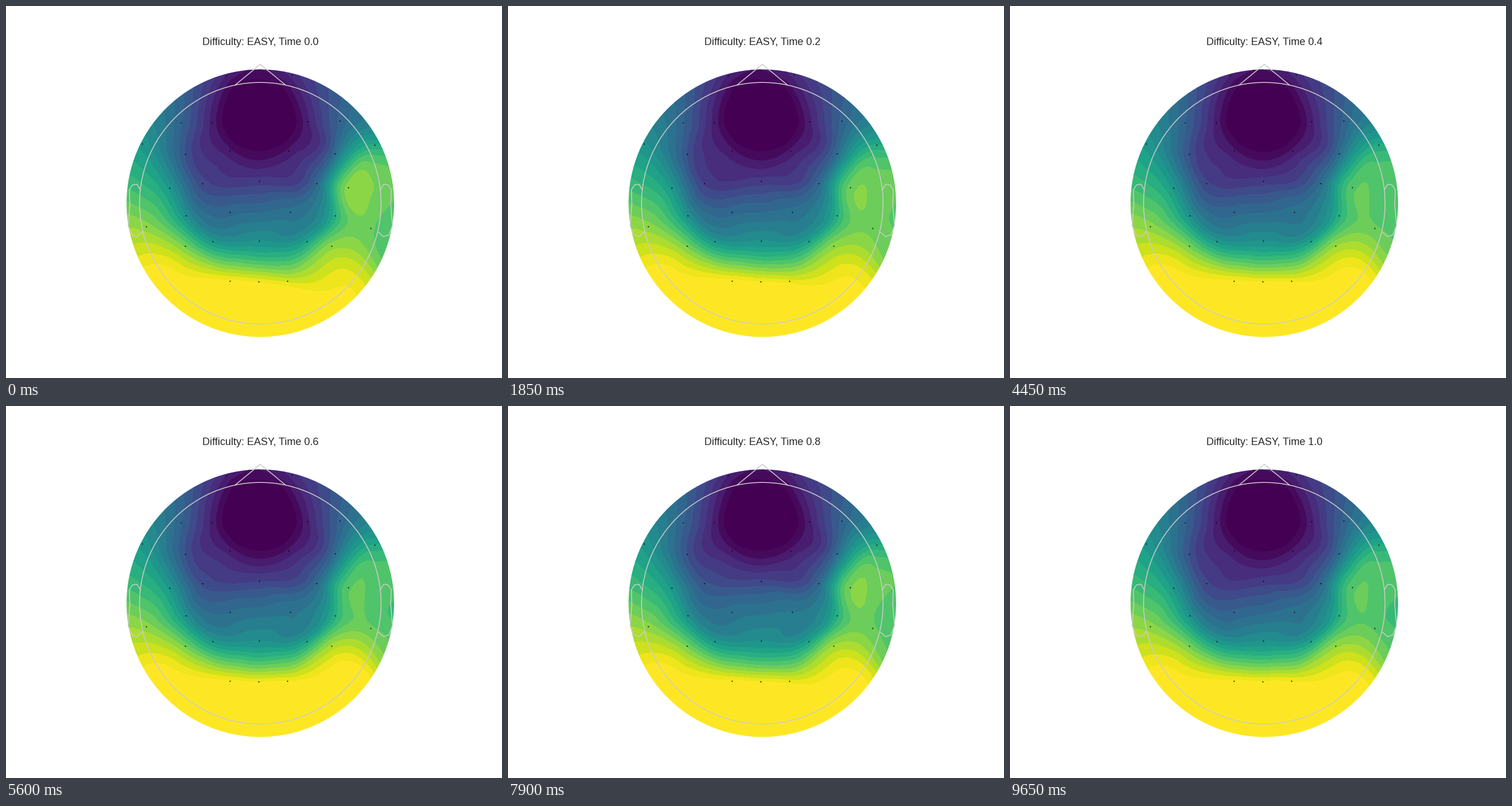
Write a matplotlib script that moves like this. It is 864x648 px and loops after 10 s.

```python
import numpy as np
import matplotlib.pyplot as plt
from matplotlib.animation import FuncAnimation
from matplotlib.patches import Circle
from matplotlib.tri import CubicTriInterpolator, Triangulation

WIDTH, HEIGHT, DPI = 864, 648, 72
STEP_MS, FRAMES = 50, 200
CENTER = np.array([443.0, 343.5])
HEAD_R, CLIP_R = 210.4, 233.0
LINE = dict(color="0.8", lw=1.5, solid_capstyle="round", zorder=3)

# electrode: x, y, resting level on the colour scale
SENSORS = {
    "Fp1": (382.5, 121, .10), "Fp2": (498, 119.5, .12),
    "F7": (304.5, 202.5, .31), "F3": (359, 202.5, .08), "Fz": (441, 201, -.2),
    "F4": (524.5, 201, .08), "F8": (581, 199.5, .31),
    "FT9": (236.5, 240, .53), "FC5": (311.5, 258, .25), "FC1": (390, 252, .06),
    "FC2": (492, 252, .06), "FC6": (572.5, 257, .35), "FT10": (641.5, 241.5, .60),
    "T7": (284.5, 316.5, .53), "C3": (342, 308.5, .22), "Cz": (441, 304.5, .17),
    "C4": (541, 308.5, .33), "T8": (595.5, 316, .82),
    "TP9": (244, 383.5, .82), "CP5": (313, 365, .50), "CP1": (389.5, 359, .33),
    "CP2": (495, 359, .37), "CP6": (572.5, 365, .62), "TP10": (634.5, 386.5, .76),
    "P7": (312, 417.5, .78), "P3": (360, 410, .53), "Pz": (440.5, 408.5, .50),
    "P4": (523.5, 410, .57), "P8": (567, 417.5, .82),
    "O1": (390, 479, 1.01), "Oz": (439.5, 479.5, .98), "O2": (489.5, 478.5, .93),
}
NAMES = list(SENSORS)
POS = np.array([s[:2] for s in SENSORS.values()])
REST = np.array([s[2] for s in SENSORS.values()])

# drift from rest at a few moments (ms)
DRIFT = {
    400: {},
    1850: dict(T8=-.05, C3=-.03, O1=.01, Oz=.01, O2=.03, TP10=.02, FT9=-.02),
    2900: dict(T8=-.06, C3=-.02, Oz=.01, O2=.05, P8=.01, C4=.02),
    4450: dict(T8=-.09, C3=-.01, Oz=.01, O2=.05, P8=.02, C4=.02),
    6700: dict(T8=-.08, C3=.04, Cz=.05, CP1=.04, CP2=.04, FC1=.02, O2=.07, P8=.06),
    7900: dict(T8=-.03, C3=.04, Cz=.04, CP1=.04, CP2=.03, Oz=.01, O2=.03, P8=.03),
    9650: dict(T8=-.09, C3=-.01, CP1=-.02, Oz=.02, O2=.06, P8=.01, TP10=-.02),
}
# spans (ms) in which the map moves; it rests in between
ACTIVE = [(400, 950), (1100, 1150), (1350, 1550), (1700, 1850), (2000, 2000),
          (2150, 2350), (2500, 2900), (3050, 3100), (3250, 3350), (3500, 3650),
          (3850, 4000), (4300, 4800), (5000, 5000), (5250, 5750), (6000, 6200),
          (6400, 6550), (6700, 6800), (6950, 7000), (7150, 7500), (7700, 8000),
          (8200, 8350), (8500, 8700), (8900, 8950), (9100, 9650)]


def levels_at(ms):
    moved = 0
    for start, end in ACTIVE:
        if ms >= start:
            moved = min(ms, end)
    times = list(DRIFT)
    drift = [np.interp(moved, times, [d.get(n, 0) for d in DRIFT.values()])
             for n in NAMES]
    return REST + drift


def build_basis(gx, gy):
    """Response of the interpolated surface to each electrode."""
    inner = Triangulation(*POS.T).triangles
    sides = np.concatenate([POS[inner[:, 0]] - POS[inner[:, 1]],
                            POS[inner[:, 1]] - POS[inner[:, 2]]])
    gap = np.median(np.hypot(*sides.T))
    count = max(12, round(2 * np.pi / np.arcsin(gap / CLIP_R)))
    angle = np.arange(count) * 2 * np.pi / count
    rim = CENTER + (CLIP_R * 1.1 + gap) * np.column_stack([np.cos(angle), np.sin(angle)])
    tri = Triangulation(*np.concatenate([POS, rim]).T)

    # each rim point takes the mean of the electrodes it touches
    n = len(POS)
    weights = np.vstack([np.eye(n), np.zeros((count, n))])
    for a, b in np.sort(tri.edges, axis=1):
        if a < n <= b:
            weights[b, a] = 1
    total = weights.sum(axis=1, keepdims=True)
    linked = total[:, 0] > 0
    weights[linked] /= total[linked]
    weights[~linked] = weights[n:][linked[n:]].mean(axis=0)
    return np.stack([CubicTriInterpolator(tri, w, kind="min_E")(gx, gy).filled(0)
                     for w in weights.T], axis=-1)


plt.rcParams["font.family"] = "Liberation Sans"
fig = plt.figure(figsize=(WIDTH / DPI, HEIGHT / DPI), dpi=DPI, facecolor="white")
ax = fig.add_axes([0, 0, 1, 1])
ax.set(xlim=(0, WIDTH), ylim=(HEIGHT, 0))
ax.axis("off")

span = np.linspace(-CLIP_R - 2, CLIP_R + 2, 100)
GX, GY = np.meshgrid(CENTER[0] + span, CENTER[1] + span)
BASIS = build_basis(GX, GY)
BANDS = np.linspace(0, 1, 21)
clip = Circle(CENTER, CLIP_R, transform=ax.transData)


def outline(x, y):
    ax.plot(CENTER[0] + HEAD_R * np.array(x), CENTER[1] - HEAD_R * np.array(y), **LINE)


turn = np.linspace(0, 2 * np.pi, 101)
outline(np.cos(turn), np.sin(turn))
nose = np.arccos(np.deg2rad(12))
outline([-np.cos(nose), 0, np.cos(nose)], [np.sin(nose), 1.15, np.sin(nose)])
ear_x = 2 * np.array([.497, .510, .518, .5299, .5419, .54, .547, .532, .510, .489])
ear_y = 2 * np.array([.0555, .0775, .0783, .0746, .0555, -.0055, -.0932, -.1313,
                      -.1384, -.1199])
outline(ear_x, ear_y)
outline(-ear_x, ear_y)

visible = np.array([n != "Fz" for n in NAMES])
ax.plot(*POS[visible].T, "o", color="black", ms=2, mew=0, zorder=4)
title = ax.text(CENTER[0], 68, "", size=18, color="0.15", ha="center", va="baseline")
surface = None


def draw(i):
    global surface
    if surface is not None:
        surface.remove()
    surface = ax.contourf(GX, GY, BASIS @ levels_at(i * STEP_MS), BANDS,
                          cmap="viridis", vmin=0, vmax=1, extend="both", zorder=1)
    surface.set_clip_path(clip)
    title.set_text(f"Difficulty: EASY, Time {i / FRAMES:.1f}")


anim = FuncAnimation(fig, draw, frames=FRAMES, interval=STEP_MS, repeat=True,
                     repeat_delay=0, init_func=lambda: None)
plt.show()
```
